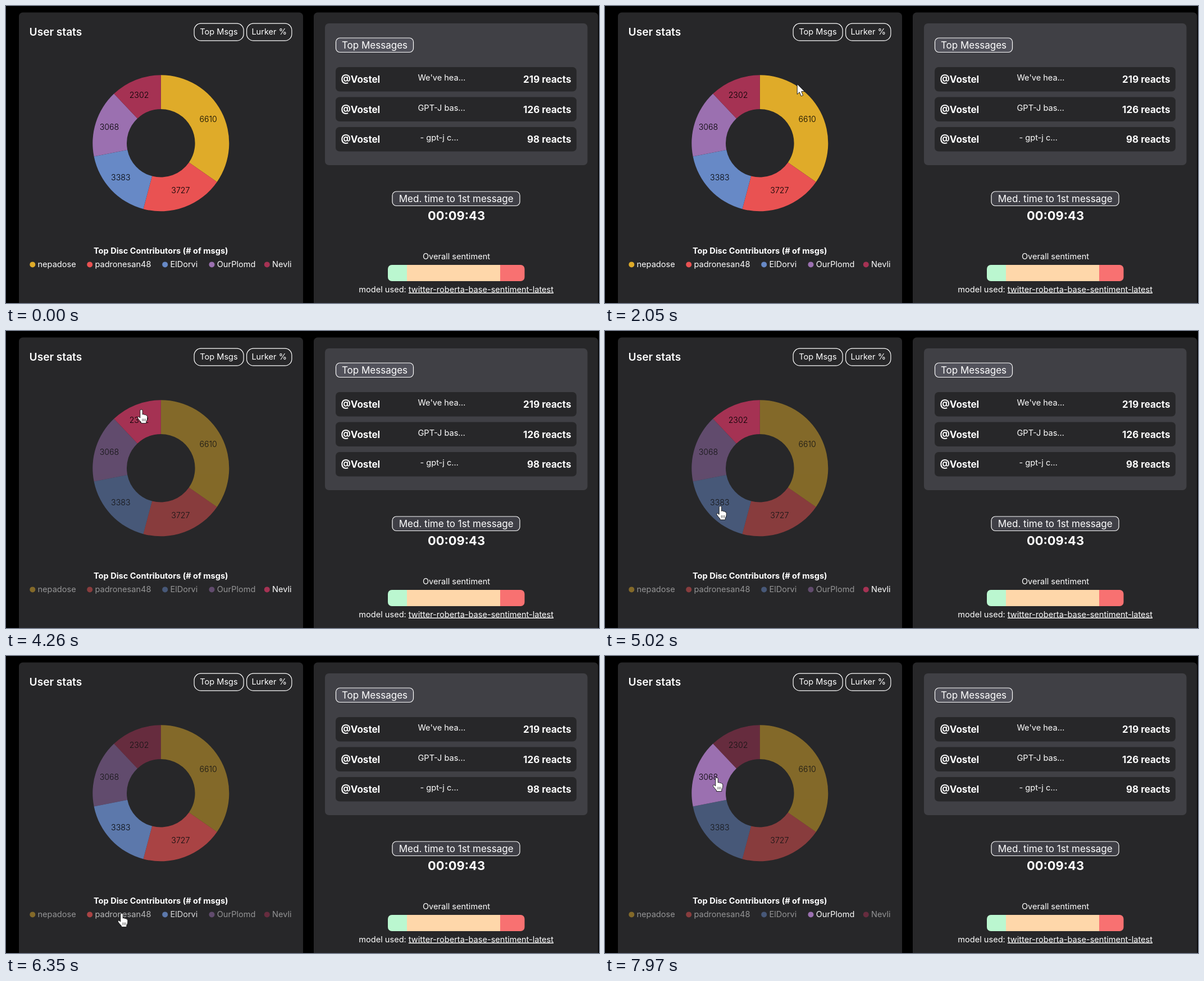
Animation of 1056 by 530 pixels, one loop 8000 ms. Source, as an HTML page:

```html
<!DOCTYPE html>
<html lang="en">
<head>
<meta charset="utf-8">
<title>User stats</title>
<style>
  html, body { margin: 0; width: 100%; height: 100%; overflow: hidden; background: #000; }
  svg { display: block; width: 1056px; height: 530px; }
  text { font-family: Inter, "Liberation Sans", sans-serif; fill: #fff; }
  .xs { font-size: 14.57px; }
  .sm { font-size: 17px; }
  .base { font-size: 19.1px; }
  .lg { font-size: 21.9px; }
  .semi { font-weight: 600; }
  .bold { font-weight: 700; }
  .mid { text-anchor: middle; }
  .end { text-anchor: end; }
  .count { fill: #000; font-size: 14.2px; font-weight: 300; }
  .panel { fill: #272729; }
  .card { fill: #404045; }
  .outline { stroke: #fff; stroke-width: 1.2; fill: none; }
  .cursor { fill: #fff; stroke: #111; stroke-width: .9; stroke-linejoin: round; }
</style>
</head>
<body>
<svg viewBox="0 0 1056 530">
  <rect class="panel" x="23" y="11.5" width="506" height="540" rx="7"/>
  <text class="base semi" x="41.6" y="52.5">User stats</text>
  <rect class="outline" x="335.1" y="31.2" width="88" height="30.7" rx="12"/>
  <text class="xs mid" x="379" y="51.3">Top Msgs</text>
  <rect class="outline" x="428.6" y="31.2" width="80.3" height="30.7" rx="12"/>
  <text class="xs mid" x="468.7" y="51.3">Lurker %</text>
  <g id="chart"></g>
  <text class="xs bold mid" x="275.8" y="442">Top Disc Contributors (# of msgs)</text>

  <rect class="panel" x="548" y="11.5" width="506.5" height="540" rx="7"/>
  <rect class="card" x="568" y="31" width="467.5" height="253" rx="7"/>
  <rect class="outline" x="587.5" y="57" width="138" height="25.5" rx="7" style="fill:#52525b"/>
  <text class="sm mid" x="656.5" y="75.8">Top Messages</text>
  <g id="rows"></g>

  <rect class="outline" x="688" y="331" width="227" height="25.5" rx="7" style="fill:#3f3f46"/>
  <text class="sm mid" x="801.7" y="350">Med. time to 1st message</text>
  <text class="lg bold mid" x="802" y="382">00:09:43</text>

  <text class="xs mid" x="802" y="452">Overall sentiment</text>
  <clipPath id="pill"><rect x="680" y="462" width="243.5" height="29" rx="7"/></clipPath>
  <g clip-path="url(#pill)">
    <rect x="680" y="462" width="34" height="29" fill="#bbf7d0"/>
    <rect x="714" y="462" width="166" height="29" fill="#fed7aa"/>
    <rect x="880" y="462" width="44" height="29" fill="#f87171"/>
  </g>
  <text class="xs mid" x="801.7" y="510.5">model used: <tspan text-decoration="underline">twitter-roberta-base-sentiment-latest</tspan></text>

  <g id="cursor" class="cursor">
    <path id="arrow" d="M0 0V18.3L4.1 14.5L7 21.6L10.4 20.2L7.5 13.3H13.2Z"/>
    <g id="hand">
      <path d="M-2.2 2.2a2.2 2.2 0 0 1 4.4 0V9q2-1.5 3.4.6q2.2-.8 3 1q2.2-.3 2.2 2.2V16q0 3-2 5.5V24.6H-.5V22.8Q-3.5 19.5-6.4 15.5Q-7.2 12.6-4.8 12.9L-2.2 15Z"/>
      <path d="M2 16.5V21M4.6 16.5V21M7.2 16.5V21" stroke-width=".7"/>
    </g>
  </g>
</svg>
<script>
const LOOP = 8000, FADE = 150;
const CX = 275.8, CY = 244.8, OUTER = 121.5, INNER = 60.8, LABEL = 91;
const $ = id => document.getElementById(id);
const clamp = k => Math.min(1, Math.max(0, k));
const easeOut = k => 1 - (1 - k) ** 2.4;

const users = [
  { name: "nepadose", count: 6610, color: "#dfab29", x: 47.3 },
  { name: "padronesan48", count: 3727, color: "#e95252", x: 149.2 },
  { name: "ElDorvi", count: 3383, color: "#6789c6", x: 283.2 },
  { name: "OurPlomd", count: 3068, color: "#9b70b0", x: 366.5 },
  { name: "Nevli", count: 2302, color: "#a53253", x: 464.8 }
];
const messages = { "We've hea…": 219, "GPT-J bas…": 126, "- gpt-j c…": 98 };

// Each move eases to its end point; bend bows it to the right.
// A user given here is fully highlighted at the time lit.
const entry = { x: 662, y: 427 };
const moves = [
  { from: 170, to: 380, x: 407, y: 283 },
  { from: 750, to: 1500, x: 378, y: 84, bend: 58 },
  { from: 1830, to: 2270, x: 334, y: 152, user: 0, lit: 2870 },
  { from: 3525, to: 3830, x: 241, y: 140, user: 4, lit: 4260 },
  { from: 4700, to: 5130, x: 204, y: 319, user: 2, lit: 5260 },
  { from: 5625, to: 6120, x: 206, y: 459, bend: 15, user: 1, lit: 6450 },
  { from: 6700, to: 7100, x: 389, y: 464, user: 3, lit: 7380 },
  { from: 7760, to: 7970, x: 199, y: 217 }
];

const point = (angle, r) => [CX + r * Math.sin(angle), CY - r * Math.cos(angle)];

function slice(a, b) {
  const big = b - a > Math.PI ? 1 : 0;
  return `M${point(a, OUTER)}A${OUTER} ${OUTER} 0 ${big} 1 ${point(b, OUTER)}` +
         `L${point(b, INNER)}A${INNER} ${INNER} 0 ${big} 0 ${point(a, INNER)}Z`;
}

const total = users.reduce((sum, u) => sum + u.count, 0);
let angle = 0;
$("chart").innerHTML = users.map(({ name, count, color, x }) => {
  const next = angle + count / total * 2 * Math.PI;
  const [lx, ly] = point((angle + next) / 2, LABEL);
  const d = slice(angle, next);
  angle = next;
  return `<g><path d="${d}" fill="${color}"/>
    <text class="count mid" x="${lx - 0.7 + 4.4 * Math.sign(lx - CX)}" y="${ly + 4.2}">${count}</text>
    <circle cx="${x}" cy="461.4" r="5" fill="${color}"/>
    <text class="xs" x="${x + 9.2}" y="466.3">${name}</text></g>`;
}).join("");
const groups = [...$("chart").children];

$("rows").innerHTML = Object.entries(messages).map(([text, count], i) => {
  const y = 109 + i * 53.5;
  const x = text.startsWith("-") ? 737.5 : 733.5;
  return `<rect class="panel" x="587" y="${y}" width="429" height="43.6" rx="7"/>
    <text class="sm bold" x="596.5" y="${y + 28}">@Vostel</text>
    <text class="xs" x="${x}" y="${y + 24}">${text}</text>
    <text class="sm bold end" x="1006.5" y="${y + 28}">${count} reacts</text>`;
}).join("");

function cursorAt(t) {
  let { x, y } = entry;
  for (const m of moves) {
    const k = easeOut(clamp((t - m.from) / (m.to - m.from)));
    x += (m.x - x) * k + (m.bend || 0) * 4 * k * (1 - k);
    y += (m.y - y) * k;
  }
  return [x, y];
}

function isClickable(x, y) {
  const r = Math.hypot(x - CX, y - CY);
  const onLegend = y > 453 && y < 470 && users.some((u, i) => {
    const right = i < 4 ? users[i + 1].x - 24 : 509;
    return x > u.x - 6 && x < right;
  });
  return (r > INNER && r < OUTER) || onLegend;
}

function opacityAt(t, user) {
  let value = 1;
  for (const m of moves.filter(m => m.lit)) {
    const goal = m.user === user ? 1 : 0.5;
    value += (goal - value) * clamp((t - m.lit) / FADE + 1);
  }
  return value;
}

function draw(t) {
  groups.forEach((g, i) => g.setAttribute("opacity", opacityAt(t, i)));
  const [x, y] = cursorAt(t);
  const hand = isClickable(x, y);
  $("cursor").style.display = t < moves[0].from ? "none" : "";
  $("cursor").setAttribute("transform", `translate(${x} ${y})`);
  $("hand").style.display = hand ? "" : "none";
  $("arrow").style.display = hand ? "none" : "";
}

const begin = performance.now();
function tick() {
  draw((performance.now() - begin) % LOOP);
  requestAnimationFrame(tick);
}
tick();
</script>
</body>
</html>
```
